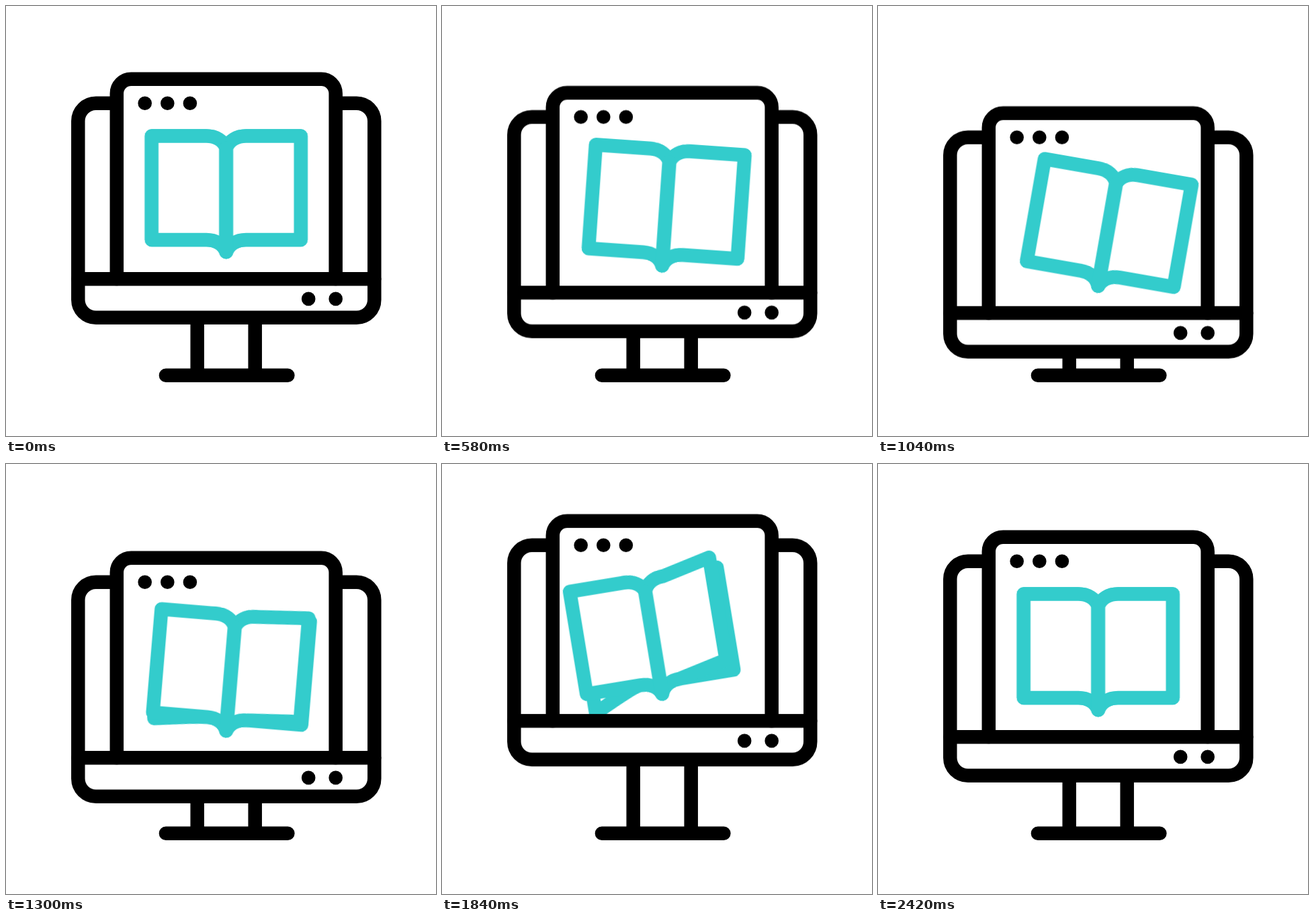
These frames come from a looping animation (640 px wide and 640 px high, 2620 ms). An HTML page:

```html
<!DOCTYPE html>
<html lang="en">
<head>
<meta charset="utf-8">
<title>Online book</title>
<style>
  html, body { margin: 0; width: 100%; height: 100%; overflow: hidden; background: #fff; }
  svg { display: block; width: 100%; height: 100%; }

  .line { fill: #fff; stroke: #000; stroke-width: 20.5; stroke-linecap: round; stroke-linejoin: round; }
  .book { stroke: #3cc; }
  .dot { fill: #000; stroke: none; }

  .bob, .tilt, .left-page, .right-page {
    animation: 2620ms cubic-bezier(.3333, 0, .6667, 1) infinite;
  }
  .bob { animation-name: bob; }
  .tilt { animation-name: tilt; }
  .left-page { animation-name: left-page; }
  .right-page { animation-name: right-page; }

  /* rest until 200 ms, low at 1080, high at 1740, rest from 2400 */
  @keyframes bob {
    0%, 7.634% { transform: translateY(0); }
    41.221% { transform: translateY(51px); }
    66.412% { transform: translateY(-25.5px); }
    91.603%, 100% { transform: translateY(0); }
  }
  @keyframes tilt {
    0%, 7.634% { transform: rotate(0deg); }
    41.221% { transform: rotate(10deg); }
    66.412% { transform: rotate(-10deg); }
    91.603%, 100% { transform: rotate(0deg); }
  }
  @keyframes left-page {
    0%, 41.221%, 91.603%, 100% {
      d: path("M0 -154.5 C-4.5 -165.5 -15.5 -172.5 -29.5 -172.5 L-111 -172.5 L-111 -18 C-111 -18 -41 -18 -29.5 -18 C-15.5 -18 -4.5 -11 0 0 Z");
    }
    66.412% {
      d: path("M0 -154.5 C-4.5 -165.5 -15.5 -172.5 -29.5 -172.5 L-101.5 -140 L-101.5 14.5 C-101.5 14.5 -41 -18 -29.5 -18 C-15.5 -18 -4.5 -11 0 0 Z");
    }
  }
  @keyframes right-page {
    0%, 41.221%, 91.603%, 100% {
      d: path("M0 -154.5 C4.5 -165.5 15.5 -172.5 29.5 -172.5 L111 -172.5 L111 -18 L29.5 -18 C15.5 -18 4.5 -11 0 0 Z");
    }
    66.412% {
      d: path("M0 -154.5 C4.5 -165.5 15.5 -172.5 29.5 -172.5 L101.5 -190 L101.5 -35.5 L29.5 -18 C15.5 -18 4.5 -11 0 0 Z");
    }
  }
</style>
</head>
<body>
<svg viewBox="0 0 640 640">
  <g class="line">
    <!-- stand: the legs slide out from behind the monitor -->
    <path d="M284.7 430V549.7M370.7 430V549.7M237.9 549.7H419.4"/>

    <g class="bob">
      <rect x="107.3" y="144.7" width="441" height="319" rx="26.5"/>
      <path d="M164.8 406V130.3A21.5 21.5 0 0 1 186.3 108.8H469.2A21.5 21.5 0 0 1 490.7 130.3V406"/>
      <g class="dot">
        <circle cx="206.7" cy="144.7" r="10.3"/>
        <circle cx="240.3" cy="144.7" r="10.3"/>
        <circle cx="273.9" cy="144.7" r="10.3"/>
        <circle cx="450.2" cy="435.9" r="10.3"/>
        <circle cx="490.7" cy="435.9" r="10.3"/>
      </g>

      <g class="book" transform="translate(327.7 366)">
        <g class="tilt">
          <path class="left-page" d="M0 -154.5 C-4.5 -165.5 -15.5 -172.5 -29.5 -172.5 L-111 -172.5 L-111 -18 C-111 -18 -41 -18 -29.5 -18 C-15.5 -18 -4.5 -11 0 0 Z"/>
          <path d="M0 -154.5C-4.5 -165.5 -15.5 -172.5 -29.5 -172.5H-111V-18H-29.5C-15.5 -18 -4.5 -11 0 0Z"/>
          <path d="M0 -154.5C4.5 -165.5 15.5 -172.5 29.5 -172.5H111V-18H29.5C15.5 -18 4.5 -11 0 0Z"/>
          <path class="right-page" d="M0 -154.5 C4.5 -165.5 15.5 -172.5 29.5 -172.5 L111 -172.5 L111 -18 L29.5 -18 C15.5 -18 4.5 -11 0 0 Z"/>
          <path d="M0 -154.5V0"/>
        </g>
      </g>

      <path d="M107.3 406.3H548.3"/>
    </g>
  </g>
</svg>
</body>
</html>
```
